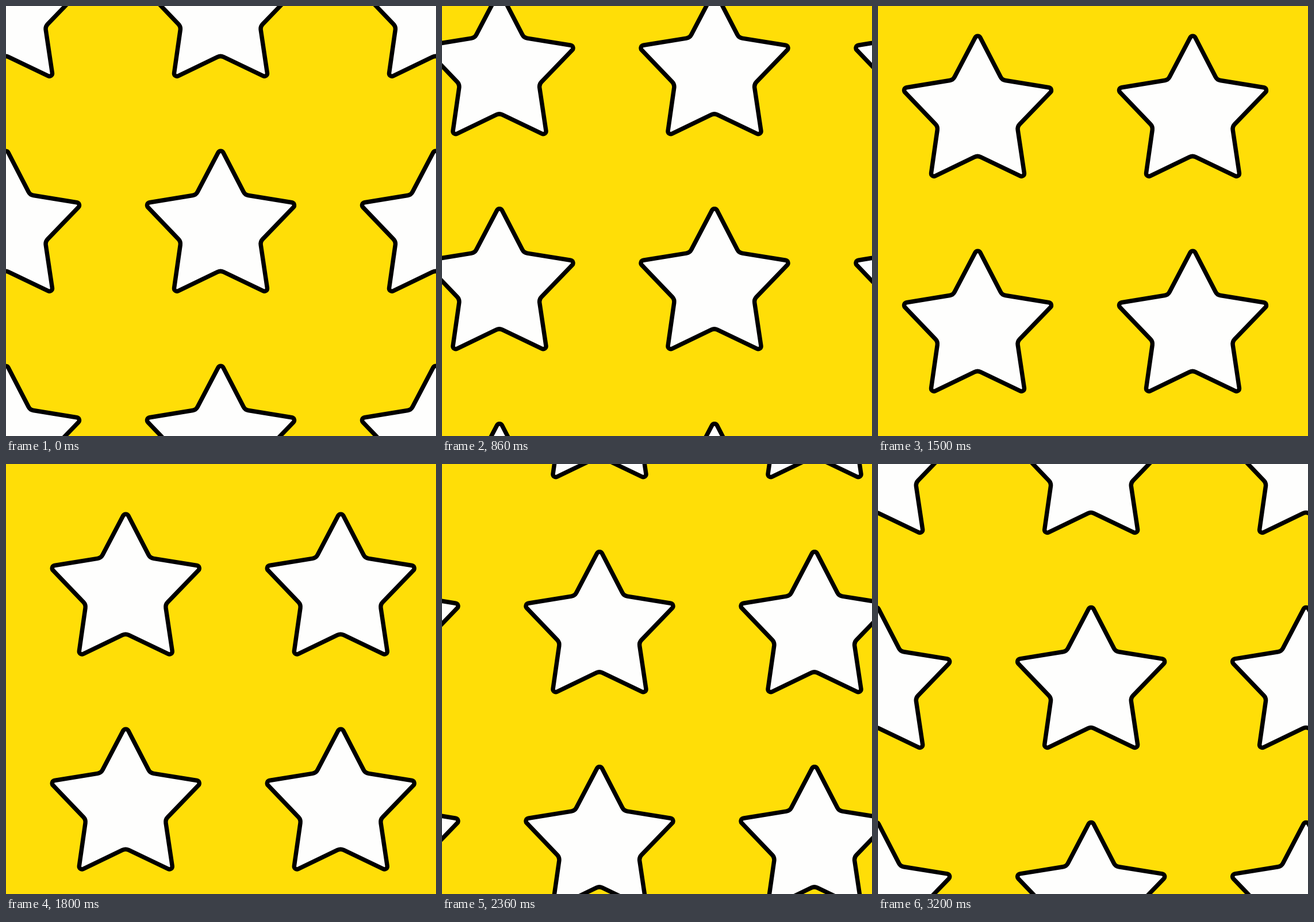
Recreate the animation shown at these times as an HTML page with a canvas. Size 748 px wide and 748 px high, loop 3.23 s.

```html
<!DOCTYPE html>
<html lang="en">
<head>
<meta charset="utf-8">
<title>Drifting stars</title>
<style>
  html, body { margin: 0; width: 100%; height: 100%; overflow: hidden; background: #ffde07; }
  canvas { display: block; width: 748px; height: 748px; }
</style>
</head>
<body>
<canvas id="stage" width="748" height="748"></canvas>
<script>
const SIZE = 748;
const TILE = SIZE / 2;
const LOOP = 3230;
const STEP = 116 / 30; // drift per tick, in px, on both axes
const CENTER = { x: 373.5, y: 386.5 };
const TIP = { reach: 140, round: 5, dx: 0, dy: 0 };
const NOTCH = { reach: 72.7, round: 12, dx: -0.3, dy: 0.9 }; // hand-drawn look: slightly off-centre

const ctx = document.getElementById('stage').getContext('2d');

// Five-pointed star around the origin with rounded tips and notches.
function makeStar() {
  const corners = Array.from({ length: 10 }, (_, i) => {
    const { reach, round, dx, dy } = i % 2 ? NOTCH : TIP;
    const angle = i * Math.PI / 5;
    return { x: dx + reach * Math.sin(angle), y: dy - reach * Math.cos(angle), round };
  });
  const path = new Path2D();
  const last = corners[9];
  path.moveTo((last.x + corners[0].x) / 2, (last.y + corners[0].y) / 2);
  corners.forEach((c, i) => {
    const next = corners[(i + 1) % 10];
    path.arcTo(c.x, c.y, next.x, next.y, c.round);
  });
  path.closePath();
  return path;
}

const star = makeStar();

// Ticks run at 30 per second, with their times cut to whole 10 ms.
function tickAt(ms) {
  const slot = Math.floor(ms / 10);
  return Math.ceil(3 * (slot + 1) / 10) - 1;
}

function draw(ms) {
  const drift = tickAt(ms) * STEP;
  ctx.setTransform(1, 0, 0, 1, 0, 0);
  ctx.fillStyle = '#ffde07';
  ctx.fillRect(0, 0, SIZE, SIZE);
  ctx.fillStyle = '#fefefd';
  ctx.strokeStyle = '#000';
  ctx.lineWidth = 7.5;
  ctx.lineJoin = 'round';
  for (let row = -2; row <= 1; row++) {
    for (let col = -2; col <= 1; col++) {
      ctx.setTransform(1, 0, 0, 1,
        CENTER.x + col * TILE + drift,
        CENTER.y + row * TILE + drift);
      ctx.fill(star);
      ctx.stroke(star);
    }
  }
}

const start = performance.now();

function play() {
  draw((performance.now() - start) % LOOP);
  requestAnimationFrame(play);
}

play();
</script>
</body>
</html>
```
